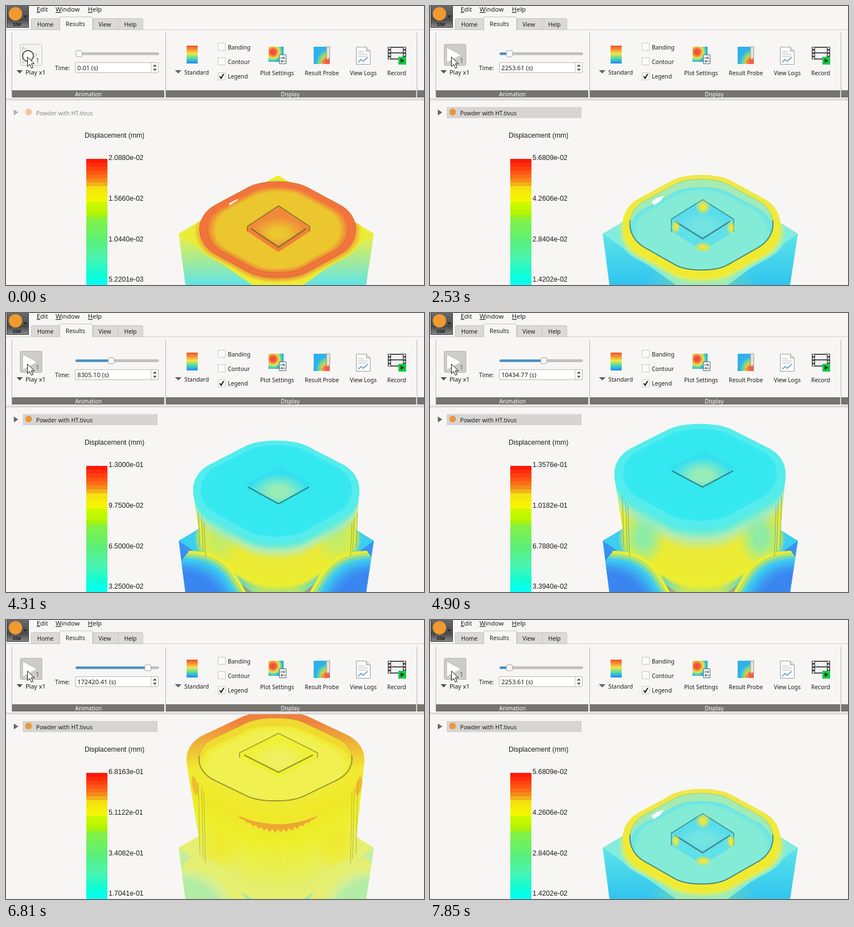
These frames come from a looping animation (750 px wide and 500 px high, 8000 ms). An HTML page with a canvas:

```html
<!DOCTYPE html>
<html lang="en">
<head>
<meta charset="utf-8">
<title>Displacement playback</title>
<style>
  html, body { margin: 0; width: 100%; height: 100%; overflow: hidden; background: #f7f6f4; }
  canvas, svg { position: absolute; left: 0; top: 0; width: 750px; height: 500px; }
  text { font: 10.3px "Noto Sans", "Open Sans", sans-serif; fill: #1c1c1c; }
  .menu text { font-size: 11.4px; }
  .menu tspan { text-decoration: underline; }
  .group text { font-size: 9.9px; fill: #fff; }
  .plot text { font: 12.4px "Liberation Sans", Arial, sans-serif; }
</style>
</head>
<body>
<canvas id="view" width="750" height="500"></canvas>
<svg viewBox="0 0 750 500">
  <defs>
    <linearGradient id="rainbow" x2="0" y2="1">
      <stop offset="0" stop-color="#f4502c"/><stop offset=".25" stop-color="#f49a38"/>
      <stop offset=".45" stop-color="#f2e648"/><stop offset=".7" stop-color="#58dc98"/>
      <stop offset=".85" stop-color="#30b4ec"/><stop offset="1" stop-color="#2a86e0"/>
    </linearGradient>
    <radialGradient id="heat" cx=".3" cy=".35" r=".8">
      <stop offset=".2" stop-color="#f0503c"/><stop offset=".38" stop-color="#f4a040"/>
      <stop offset=".52" stop-color="#e8e850"/><stop offset=".7" stop-color="#48d8b0"/>
      <stop offset=".9" stop-color="#2c98e4"/>
    </radialGradient>
    <radialGradient id="probe" cx=".95" cy=".95" r="1.1">
      <stop offset=".2" stop-color="#f0604c"/><stop offset=".4" stop-color="#f0c040"/>
      <stop offset=".55" stop-color="#70dc90"/><stop offset=".75" stop-color="#30b0ec"/>
    </radialGradient>
    <linearGradient id="dark" x2="0" y2="1">
      <stop stop-color="#6c6c6c"/><stop offset=".65" stop-color="#4a4a4a"/><stop offset="1" stop-color="#8a8a8a"/>
    </linearGradient>
  </defs>

  <rect x="1.5" y="-2" width="39" height="40.500" fill="url(#dark)" stroke="#3a3a3a"/>
  <circle cx="17" cy="14" r="12" fill="#f09a30"/>
  <path d="M31 17h7l-3.500 4z" fill="#222"/>
  <text x="12" y="36" style="font-size:8px;font-weight:700">SIM</text>
  <g class="menu">
    <text x="55" y="10"><tspan>E</tspan>dit</text>
    <text x="89" y="10"><tspan>W</tspan>indow</text>
    <text x="147" y="10"><tspan>H</tspan>elp</text>
  </g>

  <path d="M0 42.500H750" stroke="#cfcecb"/>
  <g fill="#dbdad6" stroke="#c2c1bd">
    <path d="M45.500 42.500v-18q0-2 2-2H96.500v20zM156.500 42.500v-20h45v20zM201.500 42.500v-20h42q2 0 2 2v18z"/>
    <path d="M96.500 43.500v-22q0-2 2-2h55q2 0 2 2v22" fill="#f7f6f4"/>
  </g>
  <text x="56" y="37">Home</text><text x="107" y="36">Results</text>
  <text x="166" y="37">View</text><text x="212" y="37">Help</text>

  <path d="M10.500 48V164M286.500 48V164M737.500 48V164" stroke="#b4b3af"/>
  <path d="M0 166.500H750M0 168.500H750" stroke="#c4c3bf"/>
  <path d="M2.500 98V113M5.500 98V113" stroke="#d0cfcb" stroke-dasharray="1 2"/>
  <path d="M11 151h273v13H11zM287 151h449v13H287zM738 151h12v13h-12z" fill="#75746e"/>
  <g class="group"><text x="124" y="161.500">Animation</text><text x="493" y="161.500">Display</text></g>

  <rect id="button" x="25.500" y="68.500" width="39" height="38" rx="2"/>
  <path id="arrow" d="M30 74L56 88L30 102z"/>
  <text x="53" y="102" style="font-size:12.500px;fill:#666">1</text>
  <path d="M19 115h11l-5.500 6z" fill="#555"/>
  <text x="35" y="122.500" style="font-size:10.900px">Play x1</text>

  <rect x="125" y="83.500" width="149" height="4" rx="1.500" fill="#c3c2be" stroke="#aaa9a5" stroke-width=".6"/>
  <rect id="progress" x="125" y="83.500" height="4" rx="1.500" fill="#3c92c8"/>
  <rect id="knob" y="80" width="11" height="11" rx="2.500" fill="#f8f8f7" stroke="#a2a19d"/>
  <text x="88" y="115">Time:</text>
  <rect x="124.500" y="101.500" width="149" height="18" rx="1.500" fill="#fff" stroke="#b6b5b1"/>
  <path d="M260.500 102V119" stroke="#c6c5c1"/>
  <path d="M263.500 108.500h7l-3.500-4zM263.500 112.500h7l-3.500 4z" fill="#555"/>
  <text id="seconds" x="128" y="115" style="font-size:11.200px"></text>

  <rect x="324" y="71" width="20" height="32" fill="url(#rainbow)"/>
  <path d="M303 115h12l-6 6z" fill="#666"/><text x="320" y="123">Standard</text>
  <g fill="#fafaf9" stroke="#c8c7c3">
    <path d="M380.500 66.500h13v13h-13zM380.500 92.500h13v13h-13zM380.500 119.500h13v13h-13z"/>
  </g>
  <path d="M383.500 126l2.500 3.500l4.500-7.500" fill="none" stroke="#111" stroke-width="2"/>
  <text x="398" y="78">Banding</text><text x="398" y="104">Contour</text><text x="398" y="130">Legend</text>

  <rect x="471" y="73" width="27" height="27" fill="url(#heat)"/>
  <path d="M490.500 87.500h12v16h-12z" fill="#f4f6f8" stroke="#48667c"/>
  <path d="M492 93h8m-3-2l3 2l-3 2M501 99h-8m3-2l-3 2l3 2" fill="none" stroke="#444"/>
  <text x="456" y="124">Plot Settings</text>
  <rect x="552" y="73" width="29" height="31" fill="url(#probe)"/>
  <path d="M575 73h6v19l-4 5l-2-5z" fill="#e6e4dc" stroke="#8a8474" stroke-width=".8"/>
  <path d="M566 102l9-8" stroke="#c05040"/>
  <text x="536" y="124">Result Probe</text>
  <path d="M628.500 73.500h18l7 7v24h-25z" fill="#fcfcfb" stroke="#999"/>
  <path d="M646.500 73.500v7h7" fill="#ddd" stroke="#999"/>
  <path d="M632 82h11M632 86h17M632 90h17" stroke="#b4b4b4"/>
  <path d="M632 101l5-5l4 3l8-7" fill="none" stroke="#4890b8" stroke-width="1.400"/>
  <text x="617" y="124">View Logs</text>
  <path d="M685 73h33v23h-33z" fill="#4c4c4c"/>
  <path d="M691 75h21v8h-21zM691 85h21v9h-21z" fill="#f2f2f0"/>
  <path d="M688 74v22M715 74v22" stroke="#f2f2f0" stroke-width="3" stroke-dasharray="3 3"/>
  <path d="M704 91h14v14h-14z" fill="#18c848"/><path d="M708 94v8l7-4z" fill="#103818"/>
  <text x="684" y="124">Record</text>

  <rect id="highlight" x="30" y="181" width="242" height="20" fill="#d6d5d2"/>
  <g id="tree">
    <path d="M14 185.500v10.500l8-5.250z" fill="#666"/>
    <circle cx="40.500" cy="190" r="6" fill="#e8983c"/>
    <text x="54" y="195.500">Powder with HT.tivus</text>
  </g>
  <g class="plot">
    <text x="141" y="236">Displacement (mm)</text>
    <g id="legend"><text x="184" y="276"/><text x="184" y="349"/><text x="184" y="422"/><text x="184" y="494"/></g>
  </g>

  <circle id="click" cx="39.500" cy="89.500" r="9.700" fill="none" stroke="#111" stroke-width="1.300"/>
  <path d="M38.500 91.500v17l4-4l3 7l3-1.300l-3-6.700h5.500z" fill="#fff" stroke="#111"/>
</svg>
<script>
const ctx = document.getElementById('view').getContext('2d');
const el = id => document.getElementById(id);
const LOOP = 8000, PLAY_AT = 1940, STEP = 147.75, STEPS = 36;
const FOOT = { cx: 488, cy: 403, w: 139, u: 85, d: 87 };

const GEO = ['cx', 'cy', 'w', 'u', 'd', 'inner', 'depth', 'bossY', 'bossW', 'bossH', 'body', 'smile', 'glow', 'max', 'sec'];
const COLORS = ['rimBack', 'rimFront', 'w1', 'w2', 'w3', 'w4', 'innerWall', 'floorEdge', 'floor',
  'bossEdge', 'boss', 'body', 'line', 'plate', 'side', 'sideEnd'];

const rgb = hex => [0, 2, 4].map(i => parseInt(hex.slice(i, i + 2), 16));
const key = (at, geo, colors) => ({ at, geo, colors: colors.split(' ').map(rgb) });
const openShell = 'a8ecb8 a8ecb8 d0ee80 f0ea30 f0e030 eaec48 f0e030 38d8f0 34e4f0 48e0ec 70e8d8 50e6e6 1e8088 34e2f0 2cb0f0 3a6cf0';
const closedTop = '54ecec 54ecec 60ecdc b4ecb0 ecea38 ecee30 54ecec 38e8f0 34e8f0 34e0f0 98ecb8 54ecec 2a7c80 3ccef0 3a9af2 3a68ec';
const KEYS = [
  key(0, [487.5, 400, 140, 86, 87, .9, 1, 395, 56, 37, 9, 0, 0, .0208803, .01],
    'f4733c f4733c f4733c f0803a f09038 f0a038 f0803a f08038 ecc62e f08a3a ecc62e f0803a 7a7020 ecec34 f0f040 60e4e8'),
  key(3, [487, 390, 141, 88, 92, .91, 14, 382, 56, 35, 22, 0, .3, .0568086, 2253.61],
    'eee84c f0ea30 f0ea30 f0ea30 f0ea30 e8ee50 a8ecb0 68e4e8 84ecd6 58dcec 74e4e2 60e0e8 3e7c80 84ecdc 5ce4e8 30c4f0'),
  key(10, [486, 352, 144, 87, 92, .91, 45, 344, 61, 36, 55, .8, .5, .1231653, 5643.09], openShell),
  key(14, [485.5, 323, 148, 88, 94, .91, 62, 315, 61, 36, 70, .5, .6, .129, 7772.4], openShell),
  key(15, [485, 316, 149, 88, 94, .91, 0, 308, 62, 34, 0, 0, .7, .13, 8305.1], closedTop),
  key(19, [484.5, 287, 153.5, 89, 96, .9, 0, 279, 62, 33, 0, 0, .8, .13576, 10434.77], closedTop),
  key(24, [484, 258, 157, 89, 90, .855, 6, 248, 69, 36, 7, .8, .7, .190612, 13451.45],
    '30e8f0 30e8f0 90ecc8 f0e030 ece64a e4ee7c 60e8d8 a8ecb8 a8ecb4 3cd0f0 e8ea58 a8ecb4 5a8878 38b0f0 3a7cee 3a5ce0'),
  key(32, [483.5, 249, 159.5, 86, 88, .86, 14, 238, 70, 35, 9, .7, .5, .681632, 172420.41],
    'f08040 f0ea30 f0ea2a eee82a eef02c e4ee70 f0d830 f0ea30 f0f050 eef030 eef060 eef030 8a8a34 e6f070 d0ee98 88e8b8')
];

const clamp = v => Math.min(1, Math.max(0, v));
const lerp = (a, b, k) => a + (b - a) * k;
const mix = (a, b, k) => a.map((v, i) => lerp(v, b[i], k));
const css = (c, alpha = 1) => `rgba(${c.map(Math.round)},${alpha})`;

function ramp(stops, k) {
  let i = 1;
  while (i < stops.length - 1 && stops[i][0] < k) i++;
  const [p, a] = stops[i - 1], [q, b] = stops[i];
  return mix(a, b, clamp((k - p) / (q - p)));
}

function stateAt(index) {
  const n = Math.max(1, KEYS.findIndex(k => k.at >= index));
  const i = index >= 32 ? KEYS.length - 1 : n;
  const a = KEYS[i - 1], b = KEYS[i], k = clamp((index - a.at) / (b.at - a.at));
  const s = { index, c: {} };
  GEO.forEach((name, j) => s[name] = lerp(a.geo[j], b.geo[j], k));
  COLORS.forEach((name, j) => s.c[name] = mix(a.colors[j], b.colors[j], k));
  return s;
}

// Rounded square seen in perspective.
function rim({ cx, cy, w, u, d }, scale = 1, drop = 0) {
  const p = new Path2D();
  const m = (x, y) => [cx + x * w * scale, cy + drop + y * (y < 0 ? u : d) * scale];
  p.moveTo(...m(-.8, -.505));
  p.lineTo(...m(-.37, -.88));
  p.bezierCurveTo(...m(-.2, -1.03), ...m(.2, -1.03), ...m(.37, -.88));
  p.lineTo(...m(.8, -.505));
  p.bezierCurveTo(...m(1.067, -.27), ...m(1.067, .27), ...m(.8, .505));
  p.lineTo(...m(.37, .88));
  p.bezierCurveTo(...m(.2, 1.03), ...m(-.2, 1.03), ...m(-.37, .88));
  p.lineTo(...m(-.8, .505));
  p.bezierCurveTo(...m(-1.067, .27), ...m(-1.067, -.27), ...m(-.8, -.505));
  p.closePath();
  return p;
}

function poly(points, close = true) {
  const p = new Path2D();
  points.forEach(([x, y]) => p.lineTo(x, y));
  if (close) p.closePath();
  return p;
}

const PLATE = poly([[310, 408], [488, 303], [660, 408], [646, 500], [322, 500]]);

function fill(path, style, alpha = 1) {
  ctx.globalAlpha = alpha;
  ctx.fillStyle = style;
  ctx.fill(path);
  ctx.globalAlpha = 1;
}

function stroke(path, color, width, alpha = 1) {
  ctx.globalAlpha = alpha;
  ctx.strokeStyle = css(color);
  ctx.lineWidth = width;
  ctx.stroke(path);
  ctx.globalAlpha = 1;
}

function clipped(path, draw) {
  ctx.save();
  ctx.clip(path);
  draw();
  ctx.restore();
}

function vertical(y0, y1, a, b) {
  const g = ctx.createLinearGradient(0, y0, 0, y1);
  g.addColorStop(0, css(a));
  g.addColorStop(1, css(b));
  return g;
}

function glow(x, y, r, squash, color, alpha) {
  ctx.save();
  ctx.translate(x, y);
  ctx.scale(1, squash);
  const g = ctx.createRadialGradient(0, 0, 0, 0, 0, r);
  g.addColorStop(.3, css(color, alpha));
  g.addColorStop(1, css(color, 0));
  ctx.fillStyle = g;
  ctx.fillRect(-r, -r, 2 * r, 2 * r);
  ctx.restore();
}

function nested(shape, from, to, a, b, drop = 0) {
  for (let i = 0; i <= 6; i++) fill(rim(shape, lerp(from, to, i / 6), drop), css(mix(a, b, i / 6)));
}

function drawPlate({ c, glow: warmth }) {
  fill(PLATE, css(c.plate));
  const side = vertical(408, 500, c.side, c.sideEnd);
  fill(poly([[310, 408], [322, 500], [442, 500]]), side);
  fill(poly([[660, 408], [646, 500], [534, 500]]), side);
  clipped(PLATE, () => {
    nested(FOOT, 1.09, 1, c.plate, c.w4);
    glow(488, 495, 100, .4, c.w4, warmth);
  });
}

// Cold corners of the plate spreading into the foot of the wall.
function drawCold({ c, index }) {
  const stops = [[0, c.w4], [.35, c.plate], [.75, c.side], [1, mix(c.side, c.sideEnd, .4)]];
  const strength = clamp((index - 3) / 6);
  for (const sign of [-1, 1]) for (let i = 0; i <= 8; i++) {
    const at = (x, y) => [488 + sign * (x + 3.5 * i), y + 4.5 * i];
    const p = new Path2D();
    p.moveTo(...at(160, 426));
    p.bezierCurveTo(...at(95, 428), ...at(82, 455), ...at(52, 510));
    p.lineTo(...at(190, 510));
    fill(p, css(ramp(stops, i / 8)), strength);
  }
}

function drawWall(s) {
  const { c, cy } = s, rows = Math.max(4, Math.round(FOOT.cy - cy));
  const stops = [[0, c.rimFront], [.08, c.w1], [.22, c.w2], [.42, c.w3], [1, c.w4]];
  for (let i = rows; i >= 0; i--) {
    const k = i / rows, shape = {};
    for (const n in FOOT) shape[n] = lerp(s[n], FOOT[n], k);
    fill(rim(shape), css(ramp(stops, k)));
  }
  const pale = .75 * clamp((s.index - 12) / 8);
  glow(383, 402, 40, 1.3, c.w1, pale);
  glow(593, 402, 40, 1.3, c.w1, pale);
  clipped(PLATE, () => drawCold(s));

  const hot = css(rgb('f08c38')), y = cy + 112;
  const arc = x => y - 12 + 17 * (1 - (x / 75) ** 2);
  const smile = [];
  for (let x = -75; x <= 75; x += 5) smile.push([488 + x, arc(x)]);
  for (let x = 70; x >= -70; x -= 5) smile.push([488 + x, arc(x) + (x % 10 ? 15 : 9) * (1 - (x / 75) ** 2)]);
  fill(poly(smile), hot, s.smile);
  for (const sign of [-1, 1]) {
    if (s.index > 16) {
      const spot = new Path2D();
      spot.ellipse(486 + sign * 147, cy + 48, 5, 17, sign * .2, 0, 7);
      fill(spot, hot, s.smile * .7);
    }
    if (cy < 375) [140, 134, 130].forEach((x, i) =>
      stroke(poly([[488 + sign * (x + 3), cy + 42 + 8 * i], [488 + sign * x, 420 + 8 * i]], false), c.line, 1, .55));
  }
}

function drawBoss(s) {
  const { c, bossY: y, bossW: w, bossH: h, body } = s, x = 489;
  const W = [x - w, y], E = [x + w, y], N = [x, y - h], S = [x, y + h];
  const under = ([px, py]) => [px, py + body];
  fill(poly([W, S, E, under(E), under(S), under(W)]), css(c.body));
  if (s.depth > 20) glow(x, y + h + 15, 22, 2, rgb('98e8b8'), .7);
  const top = poly([W, N, E, S]);
  fill(top, css(c.bossEdge));
  clipped(top, () => glow(x, y + 12, w * .85, .6, c.boss, 1));
  const edge = Math.min(1, body / 5);
  stroke(poly([under(W), W, N, E, under(E)], false), c.line, 1.5, edge * .85);
  stroke(poly([[x - w * .88, y + 4], [x, y + h], [x + w * .88, y + 4]], false), c.line, 2.4, .9);
  const spots = Math.max(0, 1 - Math.abs(s.index - 3) / 3);
  if (spots) [[490, 360, 14, 1], [441, 396, 8, 1.6], [540, 397, 8, 1.6], [490, 432, 16, .6]]
    .forEach(([px, py, r, q]) => glow(px, py, r, q, rgb('eee63c'), spots));
}

function drawTop(s) {
  const { c, cx, cy, u, d, inner, depth } = s;
  fill(rim(s), vertical(cy - u * .8, cy + d * .2, c.rimBack, c.rimFront));
  stroke(rim(s), c.line, 1, Math.max(0, .5 - s.index * .2));
  const hole = rim(s, inner);
  clipped(hole, () => {
    fill(hole, vertical(cy - u, cy + d * .3, c.innerWall, mix(c.innerWall, c.floorEdge, .3)));
    if (depth > 20) {
      const hot = css(rgb('f09040'));
      fill(poly([[370, cy - 6], [395, cy - 32], [456, cy - 54], [420, cy - 30], [380, cy - 12]]), hot, s.smile);
      fill(poly([[517, cy - 56], [546, cy - 41], [536, cy - 43]]), hot, s.smile);
    }
    nested(s, inner, inner - .1, c.floorEdge, c.floor, depth);
    if (s.index < 15) fill(poly([[397, 351], [407, 344], [420, 340], [414, 349], [402, 357]]), '#fbfbfa');
    drawBoss(s);
  });
  const visible = Math.min(1, depth / 5);
  stroke(hole, c.line, 1, visible * .3);
  const front = new Path2D();
  front.rect(cx - 170, cy - 6, 340, 120);
  clipped(front, () => stroke(hole, c.line, 2, visible * .85));
}

const LEGEND = [[0, 'ff1808'], [.08, 'ff5a14'], [.14, 'f0a41c'], [.16, 'f4e010'], [.24, 'f6f600'], [.26, 'ccfa00'],
  [.33, 'b4f400'], [.36, '84f244'], [.5, '58f07c'], [.6, '4cf4b0'], [.7, '10fcd4'], [.78, '00ffff']]
  .map(([k, hex]) => [k, rgb(hex)]);

function drawLegend() {
  for (let y = 274; y < 500; y += 7) {
    ctx.fillStyle = css(ramp(LEGEND, (y - 274) / 290));
    ctx.fillRect(144, y, 38, 7);
  }
}

function drawControls(s, t) {
  const playing = t >= PLAY_AT, x = 131 + 3.86 * s.index;
  const set = (id, attrs) => { for (const n in attrs) el(id).setAttribute(n, attrs[n]); };
  set('button', { fill: playing ? '#cdccca' : '#f4f3f1', stroke: playing ? '#b4b3b0' : '#c4c3c0' });
  set('arrow', { fill: playing ? '#fff' : '#f8f8f7', stroke: playing ? '#bbb' : '#aaa' });
  set('knob', { x: x - 5.5 });
  set('progress', { width: s.index ? x - 130 : 0 });
  set('highlight', { opacity: playing ? 1 : 0 });
  set('tree', { opacity: t < 890 ? .5 : 1 });
  set('click', { opacity: t < 140 ? 1 : 0 });
  el('seconds').textContent = s.sec.toFixed(2) + ' (s)';
  [...el('legend').children].forEach((label, i) =>
    label.textContent = (s.max * (1 - i / 4)).toExponential(4).replace('e-', 'e-0'));
}

function frame() {
  const t = performance.now() % LOOP;
  const step = Math.floor((t - PLAY_AT) / STEP + .08);
  const s = stateAt(step < 1 ? 0 : (step - 1) % STEPS);
  ctx.fillStyle = '#f7f6f4';
  ctx.fillRect(0, 0, 750, 500);
  const viewport = new Path2D();
  viewport.rect(0, 169, 750, 331);
  clipped(viewport, () => {
    drawPlate(s);
    drawWall(s);
    drawTop(s);
  });
  drawLegend();
  drawControls(s, t);
  requestAnimationFrame(frame);
}
frame();
</script>
</body>
</html>
```
